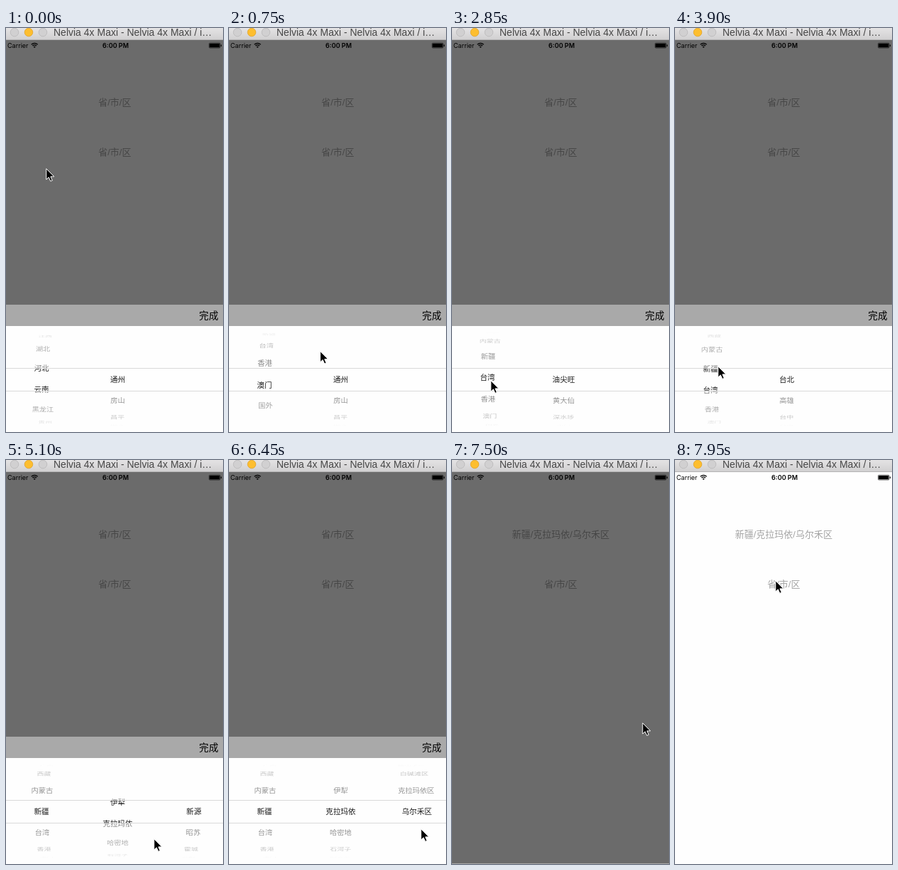
These frames come from a looping animation (306x568 px, 8000 ms). An HTML page:

```html
<!DOCTYPE html>
<html lang="zh-CN">
<head>
<meta charset="utf-8">
<title>Region picker</title>
<style>
  html, body { margin: 0; width: 100%; height: 100%; overflow: hidden; background: #fefefe; }
  svg { display: block; width: 306px; height: 568px; }
  text { font-family: "Liberation Sans", "Noto Sans CJK SC", "Noto Sans CJK", sans-serif; }
  .mid { text-anchor: middle; }
  .status { font-family: Inter, sans-serif; font-size: 9px; }
  .label { font-size: 13px; fill: #a4a4a4; }
</style>
</head>
<body>
<svg viewBox="0 0 306 568" xmlns="http://www.w3.org/2000/svg">
  <defs>
    <linearGradient id="bar" x2="0" y2="1">
      <stop offset="0" stop-color="#e4e3e4"/><stop offset="1" stop-color="#d0cfd0"/>
    </linearGradient>
    <clipPath id="inside"><rect y="479" width="306" height="31"/></clipPath>
    <clipPath id="outside"><path d="M0 419H306V478H0ZM0 511H306V568H0Z"/></clipPath>
  </defs>

  <rect width="306" height="568" fill="#fefefe"/>
  <text id="first" class="label mid" x="153.3" y="109"></text>
  <text class="label mid" x="153.3" y="179">省/市/区</text>
  <rect id="dim" y="17" width="306" height="551" opacity=".576"/>

  <g>
    <text class="status" x="2" y="28">Carrier</text>
    <path d="M35.7 23.2Q40.2 19.4 44.7 23.2M37.4 25.1Q40.2 22.8 43 25.1"
      fill="none" stroke="#000" stroke-width="1.3"/>
    <path d="M38.6 26.3Q40.2 25.1 41.8 26.3L40.2 28Z"/>
    <text class="status mid" x="154.5" y="28" font-weight="600">6:00 PM</text>
    <rect x="286.4" y="21.2" width="15.6" height="6.8" rx="1.2" fill="none" stroke="#000" stroke-width=".6"/>
    <rect x="287.1" y="21.9" width="14.2" height="5.4" rx=".5"/>
    <rect x="302.8" y="23.2" width="1.1" height="2.8" rx=".5"/>
  </g>

  <g id="sheet">
    <rect y="389" width="306" height="30" fill="#a9a9a9"/>
    <text x="272.3" y="409" font-size="13.6">完成</text>
    <rect y="419" width="306" height="149" fill="#fefefe"/>
    <g id="wheel" clip-path="url(#outside)"></g>
    <path d="M0 478.5H306M0 510.5H306" stroke="#dadada"/>
    <g id="band" clip-path="url(#inside)"></g>
  </g>

  <rect width="306" height="17" fill="url(#bar)"/>
  <path d="M0 16.5H306" stroke="#b4b3b4"/>
  <g stroke-width=".8">
    <circle cx="12" cy="6" r="5.8" fill="#d1d0d1" stroke="#b9b8b9"/>
    <circle cx="32" cy="6" r="5.8" fill="#fdbe2f" stroke="#e0a32a"/>
    <circle cx="52" cy="6" r="5.8" fill="#d1d0d1" stroke="#b9b8b9"/>
  </g>
  <text x="67" y="11" font-size="14" fill="#464646">Nelvia 4x Maxi - Nelvia 4x Maxi / i…</text>

  <path id="cursor" d="M.8 .8V16L4.3 12.8L6.8 18.4L9.3 17.3L6.9 11.9H11.8Z" stroke="#fff" stroke-linejoin="round"/>
</svg>

<script>
const LOOP = 8000, STEP = 150;
const CENTER = 494, PITCH = 30, RADIUS = 65.6, ANGLE = 26.9 * Math.PI / 180;
const $ = id => document.getElementById(id);
const words = s => s.split(' ');

const provinces = words('江西 湖北 河北 云南 黑龙江 贵州 海南 甘肃 青海 陕西 宁夏 广西 西藏 内蒙古 新疆 台湾 香港 澳门 国外');

// Lists reload once the wheel to the left settles
const cities = [
  { from: 0, rows: words('通州 房山 昌平 顺义') },
  { from: 1200, rows: words('德国 新加坡 美国 日本') },
  { from: 2250, rows: words('油尖旺 黄大仙 深水埗 屯门') },
  { from: 3150, rows: words('台北 高雄 台中 台南') },
  { from: 4650, rows: words('伊犁 克拉玛依 哈密地 石河子 阿克苏') }
];
const districts = [
  { from: 0, rows: [] },
  { from: 4650, rows: words('新源 昭苏 霍城 巩留') },
  { from: 5700, rows: words('独山子区 白碱滩区 克拉玛依区 乌尔禾区') }
];

// Places where the pointer turns: time, x, y
const stops = [
  [0, 56, 197], [600, 133, 450], [1500, 64, 500], [2100, 66, 540], [2850, 54, 495], [3300, 189, 515],
  [3900, 60, 475], [5100, 208, 532], [6450, 270, 518], [7200, 282, 403], [7500, 268, 369], [7950, 141, 169]
];

const ramp = (t, a, b) => Math.min(1, Math.max(0, (t - a) / (b - a)));
const flick = (t, a, b) => 1 - (1 - ramp(t, a, b)) ** 2;
const drag = (t, a, b) => { const p = ramp(t, a, b); return p * p * (3 - 2 * p); };

// Row at the centre of each wheel
const province = t => 2.53 + 15.47 * flick(t, 0, 1050) - 2 * drag(t, 1350, 2100)
  - drag(t, 2400, 2950) - .5 * drag(t, 3300, 3900) - .5 * drag(t, 4200, 4650);
const city = t => drag(t, 4800, 5460);
const district = t => 3 * drag(t, 5700, 6450);

const current = (lists, t) => lists.filter(l => l.from <= t).pop().rows;

function pointer(t) {
  const i = Math.max(1, stops.findIndex(s => s[0] >= t));
  const [a, x, y] = stops[i - 1], [b, toX, toY] = stops[i];
  const p = drag(t, a, b);
  return [x + (toX - x) * p, y + (toY - y) * p];
}

function label(s, x, y, sx, sy, size, style) {
  return `<text class="mid" y="${size * .38}" font-size="${size}" ${style}
    transform="translate(${x} ${y}) scale(${sx} ${sy})">${s}</text>`;
}

function column(rows, pos, x) {
  let wheel = '', band = '';
  rows.forEach((s, i) => {
    const d = i - pos, phi = d * ANGLE, c = Math.cos(phi);
    if (Math.abs(d) > 3.2) return;
    const depth = 1 - .083 * (1 - c);
    wheel += label(s, 153 + (x - 153) * depth, CENTER + RADIUS * Math.sin(phi),
      depth, c, 10.4, `opacity="${.5 * c ** 1.6}"`);
    if (Math.abs(d) < 1) band += label(s, x, CENTER + d * PITCH, 1, 1, 10.6, 'fill="#1c1c1c"');
  });
  return [wheel, band];
}

function draw(time) {
  const t = Math.floor(time / STEP) * STEP;
  const cols = [
    column(provinces, province(t), 50),
    column(current(cities, t), city(t), 157.5),
    column(current(districts, t), district(t), 264.9)
  ];
  $('wheel').innerHTML = cols.map(c => c[0]).join('');
  $('band').innerHTML = cols.map(c => c[1]).join('');
  $('sheet').setAttribute('transform', `translate(0 ${178 * ramp(t, 7200, 7500)})`);
  $('sheet').style.display = $('dim').style.display = t < 7650 ? '' : 'none';
  $('first').textContent = t < 7350 ? '省/市/区' : '新疆/克拉玛依/乌尔禾区';
  $('cursor').setAttribute('transform', `translate(${pointer(t)})`);
}

const start = performance.now();
function tick() {
  draw((performance.now() - start) % LOOP);
  requestAnimationFrame(tick);
}
tick();
</script>
</body>
</html>
```
